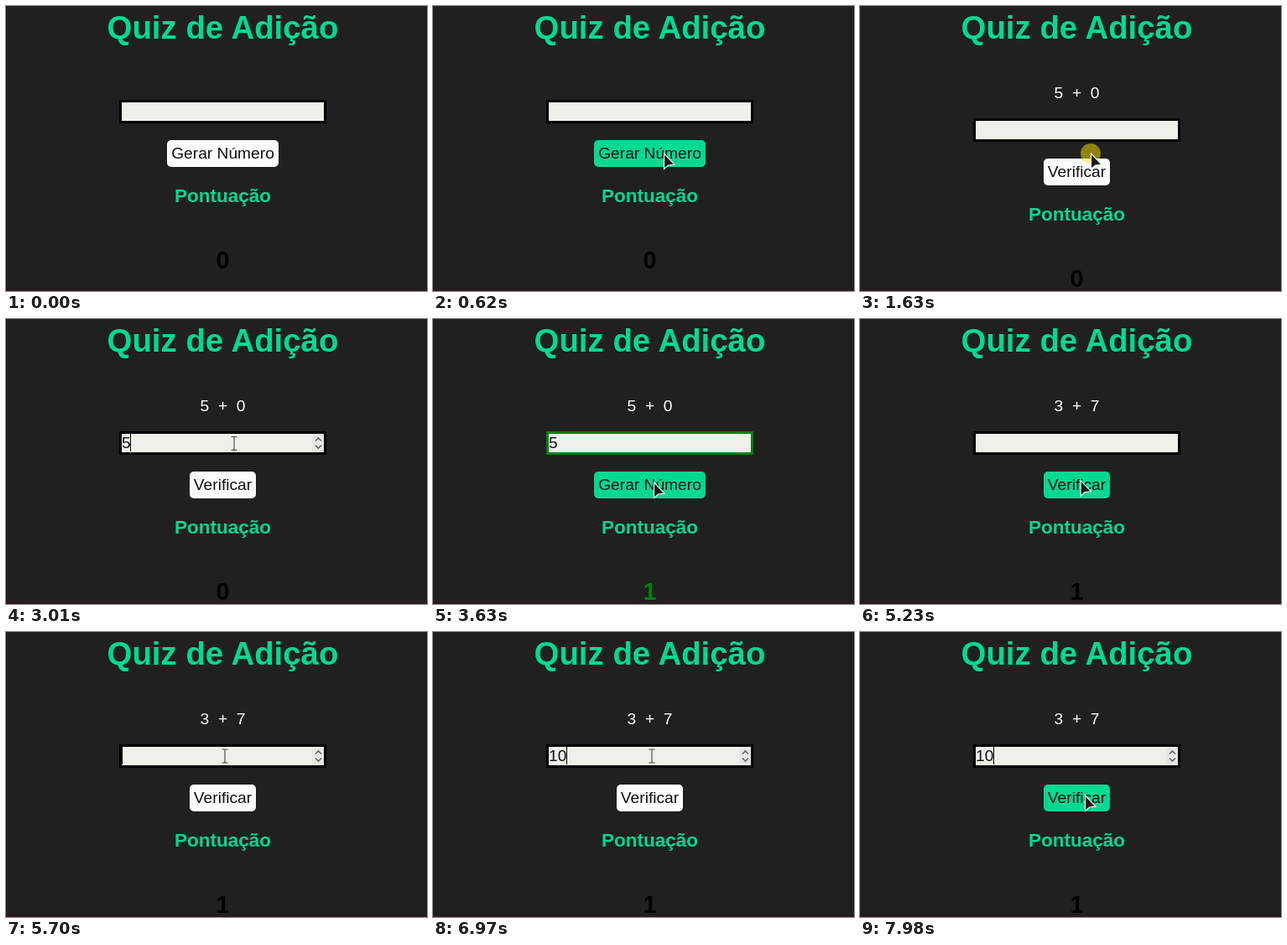
An HTML page that plays this animation: 502 by 340 pixels, repeating every 8 s.

```html
<!DOCTYPE html>
<html lang="pt">
<head>
<meta charset="utf-8">
<title>Quiz de Adição</title>
<style>
  html, body { margin: 0; width: 100%; height: 100%; overflow: hidden; background: #202020; }
  svg { display: block; }
  text { font: 19.2px "Liberation Sans", Arial, sans-serif; white-space: pre; }
  .mid { text-anchor: middle; }
  .accent { fill: #00d994; font-weight: bold; }
  #title { font-size: 38.4px; }
  #label { font-size: 22.46px; }
  #score { font-size: 28.8px; font-weight: bold; }
</style>
</head>
<body>
<svg width="502" height="340" viewBox="0 0 502 340">
  <rect y="336.5" width="502" height="4" fill="#261b20"/>
  <text id="title" class="mid accent" x="258.5" y="39">Quiz de Adição</text>
  <text id="question" class="mid" x="258.5" y="110" fill="#f8fff9"></text>
  <!-- Everything below the question shifts down once it has text -->
  <g id="form">
    <rect id="field" x="136.5" y="113.5" width="244" height="25" fill="#eff0ea" stroke-width="3"/>
    <text id="answer" x="138" y="132" fill="#111"></text>
    <g id="spinner">
      <rect x="365" y="116" width="14" height="20" fill="#e6e7e2"/>
      <path d="M369 123.5l3.5-3.5 3.5 3.5M369 128.5l3.5 3.5 3.5-3.5" fill="none" stroke="#666" stroke-width="1.6"/>
    </g>
    <rect id="caret" y="115" width="1" height="21"/>
    <rect id="button" y="160" height="32" rx="5"/>
    <text id="action" class="mid" x="258.5" y="182" fill="#0b120e"></text>
    <text id="label" class="mid accent" x="258.5" y="234">Pontuação</text>
    <text id="score" class="mid" x="258.5" y="313"></text>
  </g>
  <g id="pointer">
    <circle id="click" r="12" fill="#fce400" fill-opacity=".5"/>
    <path id="arrow" d="M.5 0V18.5L5.5 14L13 13.2Z" fill="#1a1a1a" stroke="#f4f4f0" stroke-width="1.2"/>
    <path id="beam" d="M-3.5-7.5H-1L0-7 1-7.5H3.5M0-7V8M-3.5 8.5H-1L0 8 1 8.5H3.5" fill="none" stroke="#444" stroke-width="1.1"/>
  </g>
</svg>
<script>
const LOOP = 8000;
const $ = id => document.getElementById(id);
const set = (id, attrs) => {
  for (const name in attrs) $(id).setAttribute(name, attrs[name]);
};
const show = (id, on) => set(id, { visibility: on ? 'visible' : 'hidden' });
const write = (id, text) => {
  if ($(id).textContent !== text) $(id).textContent = text;
};

// Pointer moves: [start, end, steps, x, y]; the first one starts off stage.
const origin = [480, 345];
const moves = [
  [70, 620, 9, 275, 176],
  [2200, 2270, 2, 272, 148],
  [3160, 3370, 4, 263, 195],
  [4890, 5030, 3, 263, 204],
  [5230, 5500, 5, 261, 147.5],
  [7630, 7980, 6, 268, 195]
];
const clicks = [[1630, 1690], [2480, 2550], [3560, 3630], [4420, 4490], [5630, 5700]];

function pointerAt(t) {
  let [x, y] = origin;
  for (const [start, end, steps, toX, toY] of moves) {
    if (t < start) break;
    const step = Math.floor((t - start) / (end - start) * (steps - 1) + 1e-6) + 1;
    const p = Math.min(1, step / steps);
    x += (toX - x) * p;
    y += (toY - y) * p;
  }
  return [x, y];
}

const within = (t, from, to) => t >= from && t < to;

function render(t) {
  const asked = t >= 1630;
  const second = t >= 4420;
  const correct = within(t, 3560, 4420);
  const focused = within(t, 2480, 3560) || t >= 5630;
  const shift = asked ? 22 : 0;
  const [x, y] = pointerAt(t);

  write('question', !asked ? '' : second ? '3  +  7' : '5  +  0');
  set('form', { transform: `translate(0 ${shift})` });

  const answer = second
    ? '10'.slice(0, (t >= 6640) + (t >= 6970))
    : t >= 3010 ? '5' : '';
  write('answer', answer);
  const overField = within(x, 135, 382) && within(y, 112 + shift, 140 + shift);
  set('field', { stroke: correct ? '#008010' : '#000' });
  show('spinner', overField || focused);
  show('caret', focused);
  set('caret', { x: 138 + Math.floor(answer.length * 10.68) });

  const checking = asked && !correct;
  const width = checking ? 79 : 133;
  const left = checking ? 219 : 192;
  const hover = within(x, left, left + width) && within(y, 160 + shift, 192 + shift);
  write('action', checking ? 'Verificar' : 'Gerar Número');
  set('button', { x: left, width, fill: hover ? '#00d994' : '#fcfffb' });

  write('score', t >= 3560 ? '1' : '0');
  set('score', { fill: correct ? '#008010' : '#000' });

  set('pointer', { transform: `translate(${x} ${y})` });
  const onStage = t >= 70;
  show('arrow', onStage && !overField);
  show('beam', onStage && overField);
  show('click', clicks.some(([from, to]) => within(t, from, to)));
}

function tick() {
  render(performance.now() % LOOP);
  requestAnimationFrame(tick);
}
tick();
</script>
</body>
</html>
```
